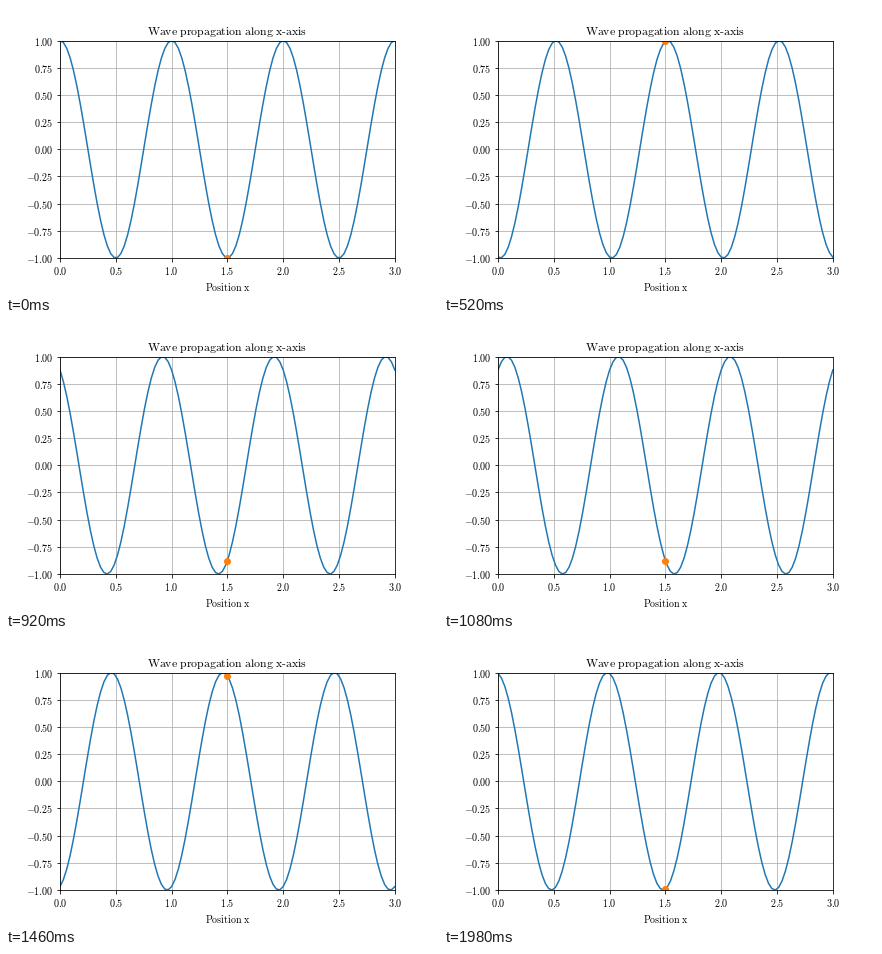
Recreate the animation shown at these times as a matplotlib script. Size 432x288 px, loop 2000 ms.

```python
import matplotlib.pyplot as plt
import numpy as np
from matplotlib.animation import FuncAnimation
from matplotlib.ticker import StrMethodFormatter

FRAMES, INTERVAL = 100, 20
PROBE_X = 1.5

plt.rcParams.update({
    "font.size": 10,
    "mathtext.fontset": "cm",
    "figure.subplot.bottom": 0.125,
    "figure.subplot.top": 0.88,
})


def roman(text):
    """Set plain words in the upright Computer Modern math face."""
    words = text.replace(" ", r"\ ")
    return rf"$\mathrm{{{words}}}$"


def wave(x, t):
    return np.cos(2 * np.pi * (x - t))


fig, ax = plt.subplots(figsize=(6, 4), dpi=72)
ax.set(xlim=(0, 3), ylim=(-1, 1))
ax.set_xticks(np.linspace(0, 3, 7))
ax.set_yticks(np.linspace(-1, 1, 9))
ax.xaxis.set_major_formatter(StrMethodFormatter(r"$\mathrm{{{x:.1f}}}$"))
ax.yaxis.set_major_formatter(StrMethodFormatter(r"$\mathrm{{{x:.2f}}}$"))
ax.set_title(roman(r"Wave propagation along \text{x-axis}"), fontsize=11.75)
ax.set_xlabel(roman("Position x"))
ax.grid(True)

xs = np.linspace(0, 3, 100)
line, = ax.plot(xs, wave(xs, 0))
dot, = ax.plot([PROBE_X], [wave(PROBE_X, 0)], "o")


def update(i):
    t = i * INTERVAL / 1000
    line.set_ydata(wave(xs, t))
    dot.set_ydata([wave(PROBE_X, t)])
    return line, dot


anim = FuncAnimation(fig, update, frames=FRAMES, interval=INTERVAL, repeat=True)
plt.show()
```
